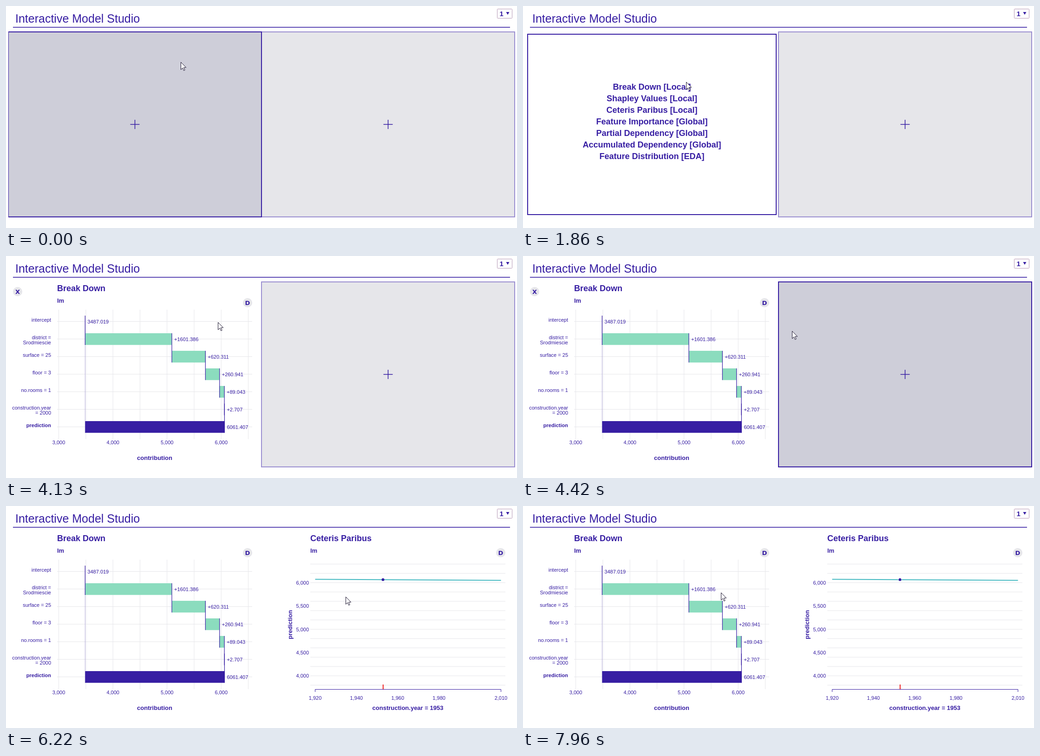
Recreate the animation shown at these times as an HTML page. Size 1100 by 480 pixels, loop 7990 ms.

```html
<!DOCTYPE html>
<html lang="en">
<head>
<meta charset="utf-8">
<title>Interactive Model Studio</title>
<style>
  html, body { margin: 0; width: 100%; height: 100%; overflow: hidden; background: #fff; }
  svg { display: block; }
  text { font-family: "Liberation Sans", Arial, sans-serif; font-size: 11px; fill: #371ea3; }
  .bold { font-weight: bold; }
  .mid { text-anchor: middle; }
  .end { text-anchor: end; }
  .h1 { font-size: 25px; }
  .h2 { font-size: 18px; font-weight: bold; }
  .h3 { font-size: 13px; font-weight: bold; }
  .key { font: bold 13px "DejaVu Sans", sans-serif; text-anchor: middle; }
  .grid { stroke: #e6e6ea; }
  .ink { stroke: #371ea3; fill: none; }
  .panel { fill: #e6e6ea; stroke: #9b8fd1; stroke-width: 2; }
  .panel.hover { fill: #ceced9; stroke: #371ea3; }
</style>
</head>
<body>
<svg id="stage" width="1100" height="480" viewBox="0 0 1100 480"></svg>
<script>
const LOOP = 7990;
const STEP = 94; // time of one bar
const AT = { leftMenu: 1700, leftPlot: 2390, hover: 4420, rightMenu: 4780, rightPlot: 6120 };
const INK = '#371ea3';

// time, x, y of the pointer tip
const PATH = [
  [460, 376, 121], [620, 394, 107], [760, 406, 102], [900, 390, 120], [1040, 350, 148],
  [1150, 333, 161], [1230, 335, 167], [1280, 341, 168], [1370, 366, 169], [1460, 351, 164],
  [3620, 351, 164], [3900, 392, 150], [4180, 470, 142], [4400, 562, 157], [4420, 578, 162],
  [4560, 652, 169], [4700, 685, 165],
  [5380, 685, 165], [5640, 708, 186], [5820, 729, 201], [5940, 731, 196],
  [7020, 731, 196], [7220, 700, 194], [7500, 600, 184], [7810, 479, 179], [7840, 470, 180], [7960, 426, 187]
];

const ROWS = [
  [['intercept'], 3487.019, 3487.019, '3487.019'],
  [['district =', 'Srodmiescie'], 3487.019, 5088.405, '+1601.386'],
  [['surface = 25'], 5088.405, 5708.716, '+620.311'],
  [['floor = 3'], 5708.716, 5969.657, '+260.941'],
  [['no.rooms = 1'], 5969.657, 6058.7, '+89.043'],
  [['construction.year', '= 2000'], 6058.7, 6061.407, '+2.707'],
  [['prediction'], 3487.019, 6061.407, '6061.407']
];
const MENU = ['Break Down [Local]', 'Shapley Values [Local]', 'Ceteris Paribus [Local]',
  'Feature Importance [Global]', 'Partial Dependency [Global]',
  'Accumulated Dependency [Global]', 'Feature Distribution [EDA]'];

const range = n => [...Array(n).keys()];
const text = (x, y, s, cls = '', more = '') => `<text x="${x}" y="${y}" class="${cls}" ${more}>${s}</text>`;
const line = (x1, y1, x2, y2, cls, more = '') =>
  `<line x1="${x1}" y1="${y1}" x2="${x2}" y2="${y2}" class="${cls}" ${more}/>`;
const group = (id, body) => `<g id="${id}">${body}</g>`;
const key = (x, y, s) => `<circle cx="${x}" cy="${y}" r="10" fill="#e6e6ea"/>` + text(x, y + 4.7, s, 'key');
const xOf = v => 113.6 + (v - 3000) * 0.11655;
const rowY = i => 129 + 38 * i;

const panel = (id, dx) => group(id, `<svg x="${dx + 4 + (dx ? 0 : 1)}" y="55" width="${dx ? 547 : 546}" height="402"
  viewBox="${dx ? dx + 4 : 5} 55 ${dx ? 547 : 546} 402">
  <rect class="panel" x="${dx + 5}" y="56" width="545" height="400"/></svg>` +
  line(dx + 267.5, 256, dx + 287.5, 256, 'ink', 'stroke-width="1.5"') +
  line(dx + 277.5, 246, dx + 277.5, 266, 'ink', 'stroke-width="1.5"'));

const menu = (id, dx, items) => group(id,
  `<rect x="${dx + 10}" y="61" width="535" height="390" fill="#fff" stroke="${INK}" stroke-width="2"/>` +
  items.map((s, i) => text(dx + 277.5, 181 + 25 * i, s, 'h2 mid')).join(''));

const heading = (x, s) => text(x, 76, s, 'h2') + text(x, 101, 'lm', 'h3') + key(x + 410, 101, 'D');

function breakDown() {
  let out = heading(110, 'Break Down') + group('close', key(25, 77, 'X'));
  range(8).forEach(i => {
    const v = 3000 + 500 * i, x = xOf(v);
    out += line(x, 116, x, 396, 'grid');
    if (i % 2 === 0) out += text(x, 407, v.toLocaleString('en-US'), 'mid');
  });
  ROWS.forEach(([names], i) => {
    out += line(110, rowY(i) + 12.5, 530, rowY(i) + 12.5, 'grid');
    names.forEach((s, k) => out += text(97, 142 + 38 * i + 11 * k, s, i === 6 ? 'end bold' : 'end'));
  });
  out += line(170.3, 129, 170.3, 382, 'ink', 'stroke-dasharray="1 2"');
  ROWS.forEach(([, a, b, label], i) => {
    out += `<rect class="bar" x="${xOf(a)}" y="${rowY(i)}" height="25.3" fill="${i === 6 ? INK : '#8bdcbe'}"/>`;
    out += text(xOf(b) + 5, 146 + 38 * i, label, 'value');
  });
  ROWS.slice(0, 6).forEach(([, , b], i) =>
    out += line(xOf(b), rowY(i), xOf(b), rowY(i), 'ink link', 'stroke-width="1.2"'));
  return out + text(320, 441, 'contribution', 'h3 mid');
}

function ceterisParibus() {
  let out = heading(655, 'Ceteris Paribus');
  range(14).forEach(i => out += line(655, 125.5 + 20.14 * i, 1075, 125.5 + 20.14 * i, 'grid'));
  range(5).forEach(i => out += text(652, 170 + 50.3 * i, (6000 - 500 * i).toLocaleString('en-US'), 'end'));
  [1920, 1940, 1960, 1980, 2010].forEach(v =>
    out += text(665.5 + (v - 1920) * 4.444, 419, v.toLocaleString('en-US'), 'mid'));
  return out + '<path class="ink" d="M665.5 402V396.5H1065.5V402"/>' +
    line(811.8, 386, 811.8, 396, '', 'stroke="#f02020" stroke-width="2"') +
    line(665.5, 158.5, 1065.5, 160.8, '', 'stroke="#46bac2" stroke-width="2"') +
    `<circle id="dot" cx="811.5" cy="159.3" r="3" fill="${INK}"/>` +
    text(865, 441, 'construction.year = 1953', 'h3 mid') +
    text(0, 0, 'prediction', 'h3 mid', 'transform="translate(615.5 256.5) rotate(-90)"');
}

const $ = id => document.getElementById(id);
$('stage').innerHTML =
  text(20, 36, 'Interactive Model Studio', 'h1') +
  line(15, 46, 1085, 46, '', 'stroke="#5f4bb5" stroke-width="2"') +
  '<rect x="1057.5" y="6.5" width="32" height="20" rx="1" fill="#fff" stroke="#b79bb8"/>' +
  text(1062.5, 22, '1', 'bold', 'style="font-size:15px"') +
  `<path d="M1076.5 13h7l-3.5 6z" fill="${INK}"/>` +
  panel('rightPanel', 545) + panel('leftPanel', 0) +
  menu('leftMenu', 0, MENU) + menu('rightMenu', 545, MENU.slice(1)) +
  group('leftPlot', breakDown()) + group('rightPlot', ceterisParibus()) +
  '<path id="pointer" d="M.5 .5V16.5L4.2 13L6.7 18.6L9.1 17.5L6.6 12H11.7Z" fill="#fff" stroke="#1c1630"/>';

const all = cls => [...document.querySelectorAll(cls)];
const bars = all('.bar'), links = all('.link'), values = all('.value');
const clamp = v => Math.min(1, Math.max(0, v));
const ease = v => v < .5 ? 4 * v ** 3 : 1 - 4 * (1 - v) ** 3;
const show = (el, on) => { el.style.display = on ? '' : 'none'; };

function pointerAt(t) {
  const n = PATH.findIndex(p => p[0] > t);
  if (n === 0) return PATH[0].slice(1);
  if (n < 0) return PATH[PATH.length - 1].slice(1);
  const [a, b] = [PATH[n - 1], PATH[n]], k = (t - a[0]) / (b[0] - a[0]);
  return [1, 2].map(i => Math.round(a[i] + (b[i] - a[i]) * k));
}

function render(t) {
  show($('leftPanel'), t < AT.leftMenu);
  show($('leftMenu'), t >= AT.leftMenu && t < AT.leftPlot);
  show($('leftPlot'), t >= AT.leftPlot);
  show($('close'), t < AT.rightPlot);
  show($('rightPanel'), t < AT.rightMenu);
  show($('rightMenu'), t >= AT.rightMenu && t < AT.rightPlot);
  show($('rightPlot'), t >= AT.rightPlot);
  $('leftPanel').querySelector('rect').classList.add('hover');
  $('rightPanel').querySelector('rect').classList.toggle('hover', t >= AT.hover);

  const grow = i => ease(clamp((t - AT.leftPlot) / STEP - i));
  bars.forEach((el, i) => el.setAttribute('width', (xOf(ROWS[i][2]) - xOf(ROWS[i][1])) * grow(i)));
  links.forEach((el, i) => el.setAttribute('y2', rowY(i) + 63.3 * grow(i)));
  values.forEach((el, i) => show(el, t >= AT.leftPlot + (i + 1) * STEP));
  $('dot').setAttribute('r', 3 * ease(clamp((t - AT.rightPlot) / STEP)));
  $('pointer').setAttribute('transform', `translate(${pointerAt(t)})`);
}

const start = performance.now();
function tick() {
  render((performance.now() - start) % LOOP);
  requestAnimationFrame(tick);
}
tick();
</script>
</body>
</html>
```
